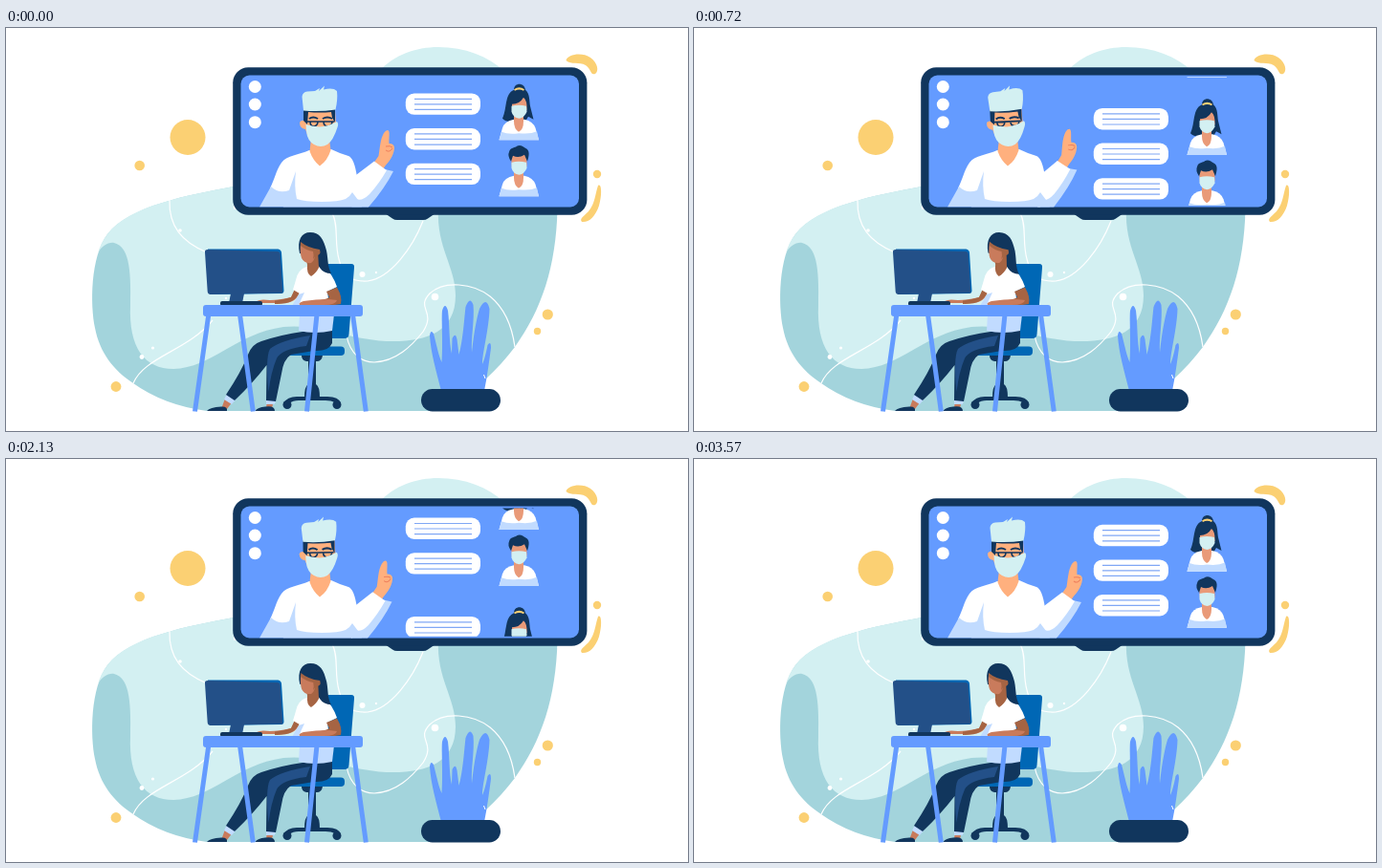
An HTML page with a canvas for the animation above (3.6 s loop, 713x422 px).

```html
<!DOCTYPE html>
<html lang="en">
<head>
<meta charset="utf-8">
<title>Online consultation</title>
<style>
  html, body { margin: 0; width: 100%; height: 100%; overflow: hidden; background: #fff; }
  canvas { display: block; }
</style>
</head>
<body>
<canvas id="stage" width="713" height="422"></canvas>
<script>
const ctx = document.getElementById('stage').getContext('2d');

const NAVY = '#11365d', BLUE = '#649bff', ROYAL = '#0067b5', DENIM = '#235088';
const MINT = '#d3f0f2', TEAL = '#a3d4dc', SKY = '#c1dbff', WHITE = '#fff', YELLOW = '#fbd073';
const PEACH = '#ffb07e', ROSE = '#e99a78', BROWN = '#a66443', TAN = '#c97b5c';

const LOOP = 3600, BEAT = 1800;
const SCROLL_TIME = 955, SCROLL_LEAD = 30, LIST_PERIOD = 140;

function fill(color, d) {
  ctx.fillStyle = color;
  ctx.fill(new Path2D(d));
}

function stroke(color, width, d) {
  ctx.strokeStyle = color;
  ctx.lineWidth = width;
  ctx.stroke(new Path2D(d));
}

function dot(color, x, y, r) {
  ctx.fillStyle = color;
  ctx.beginPath();
  ctx.arc(x, y, r, 0, Math.PI * 2);
  ctx.fill();
}

function box(color, x, y, w, h, r) {
  ctx.fillStyle = color;
  ctx.beginPath();
  ctx.roundRect(x, y, w, h, r);
  ctx.fill();
}

function turned(x, y, degrees, draw) {
  ctx.save();
  ctx.translate(x, y);
  ctx.rotate(degrees * Math.PI / 180);
  ctx.translate(-x, -y);
  draw();
  ctx.restore();
}

const easeSine = p => (1 - Math.cos(Math.PI * Math.min(1, Math.max(0, p)))) / 2;

function drawBackdrop() {
  fill(MINT, 'M389 46C406 28 428 20 452 20C480 20 503 29 522 46Z');
  fill(TEAL, 'M238 166C190 175 130 186 106 216C88 240 88 290 93 314C98 340 112 358 133 372Q165 395 210 401L460 401C490 380 515 357 532 334C560 295 575 250 576.500 190L238 190Z');
  fill(MINT, 'M238 166C190 175 128 186 106 216Q99 225 96 236C100 228 107 224 113 225C128 229 131 250 130 290C128 335 145 357 175 357C215 356 240 320 290 313C330 309 360 328 405 328C440 328 470 318 470 280C470 250 450 230 452 190L238 190Z');

  stroke(WHITE, 1.2, 'M171 180C170 208 184 224 210 235M341 194C348 206 343 224 348 242C352 260 362 266 378 265C402 262 425 230 436 202M356 322C360 342 372 350 385 350C408 349 424 333 436 318C450 296 428 294 443 278C458 264 488 267 506 281C522 294 529 312 532 334M133 372C145 344 190 338 216 306');
  dot(WHITE, 182, 212, 1.8);
  dot(WHITE, 372.5, 258, 3);
  dot(WHITE, 387, 256, 1.2);
  dot(WHITE, 448.5, 281.5, 3.8);
  dot(WHITE, 142, 344.5, 2.4);
  dot(WHITE, 153.5, 335, 1.6);
  dot(WHITE, 230, 283, 1.2);

  dot(YELLOW, 190, 114.5, 18.5);
  dot(YELLOW, 139.7, 144, 5.3);
  dot(YELLOW, 115, 375.5, 5.4);
  dot(YELLOW, 566.3, 300, 5.6);
  dot(YELLOW, 555.5, 317.5, 3.7);
  dot(YELLOW, 618, 153, 4.2);
  fill(YELLOW, 'M585.500 34C587 27 603 25 611 31C619 37 620 45 616 48C611 50 612 43 606 39C599 35 591 39 585.500 34Z');
  fill(YELLOW, 'M619 165C623 162 623 176 620 186C616 198 609 204 602 203C599 200 604 197 609 192C616 184 616 173 619 165Z');
}

function drawScreen() {
  fill(NAVY, 'M396 194L404 199.500Q406 201 409 201H436Q439 201 441 199.500L449 194Z');
  box(NAVY, 237.200, 41.200, 370.200, 154.500, 16);
  box(BLUE, 245.500, 49.500, 353.500, 138, 9);
  for (const y of [61.5, 80, 98.7]) dot(WHITE, 260.300, y, 6.5);
}

function drawMessage(y) {
  box(WHITE, 417.800, y, 78.200, 22.400, 9);
  for (const dy of [5.9, 11.4, 17]) stroke('#80a7f5', 1.2, `M427 ${y + dy}H487`);
}

function drawShoulders() {
  fill(WHITE, 'M531 96Q521 98 519 105L515.500 117.700H557L553.500 105Q551 98 542 96Z');
  fill(SKY, 'M518 109Q525 112 536 110.500Q548 112 555 108.500L557 117.700H515.500Z');
  fill(ROSE, 'M531 90H541V98Q541 107 536 109Q531 106 531 98Z');
}

function drawMask() {
  fill(MINT, 'M528.500 82Q536 80 544 82L544.500 88Q542 94 536.500 95Q530 94 528.500 88Z');
}

function drawWomanPatient() {
  fill(NAVY, 'M531 65C531 57 542 57 543 65C548 69 547 78 548 82L551.500 96L546 93L543 98H530Q523 99 519 95C524 85 521 69 531 65Z');
  fill(YELLOW, 'M531 64.500Q536.500 60.500 542 64.500L541 66Q536.500 63.500 532 66Z');
  drawShoulders();
  fill(ROSE, 'M529 80Q537 80 541 73Q545 76 544.500 86L529 88Z');
  drawMask();
}

function drawManPatient() {
  ctx.save();
  ctx.translate(0, 59);
  drawShoulders();
  fill(ROSE, 'M528 75Q537 70 544.500 75L544.500 86L529 88Z');
  drawMask();
  ctx.restore();
  fill(NAVY, 'M528 140Q524 134 526 130C527 125 532 126 534 124C538 122 541 125 543 126C548 128 547 134 545 140L542 133Q536 137 530 134Z');
}

function drawList(time) {
  const progress = easeSine(((time + SCROLL_LEAD) % BEAT) / SCROLL_TIME);
  ctx.save();
  ctx.beginPath();
  ctx.rect(410, 51.500, 155, 134.200);
  ctx.clip();
  for (let copy = 0; copy < 2; copy++) {
    ctx.save();
    ctx.translate(0, LIST_PERIOD * (copy - progress));
    for (let i = 0; i < 3; i++) drawMessage(68.8 + 36.6 * i);
    drawWomanPatient();
    drawManPatient();
    ctx.restore();
  }
  ctx.restore();
}

function drawDoctorHead() {
  fill(PEACH, 'M312 85H344L345 103Q341 121 329 123Q316 119 313 106Q307 105 307 99Q308 96 313 97Z');
  fill(NAVY, 'M311 85H344V99L341 94L340 88Q328 89 316 88L315 101L311 97Z');
  stroke(NAVY, 2, 'M317 95Q321 92 326 95M331 95Q336 92 341 95');
  stroke(NAVY, 1.600, 'M314 98H343M318 98Q318 103 322 103Q326 102 326 98M332 98Q332 103 337 103Q341 102 341 98');
  fill(MINT, 'M313.500 101Q321 103 328 103.500Q337 103 346 98Q348 100 346.500 104Q342 118 336 122Q329 126 322 122Q315 118 314 108Z');
  fill(MINT, 'M311 86.500L309.500 72Q310 67 315 66.500L323 66L328 63L327 66L333 60.500L332 64.500Q342 62 346 66Q347 75 344.500 85.500Q328 88 311 86.500Z');
}

function drawDoctorArm() {
  fill(PEACH, 'M399 107C402 107 400 116 400.500 121Q406 121 406 126C405 135 400 140 396 145L393 150L384 142L389.500 134C391 126 391 117 395 110Q397 107 399 107Z');
  stroke('#ee7f5c', 1, 'M397 124Q402 123 404 125M397 128Q401 131 404 126');
  fill(SKY, 'M364 178Q374 178 382 168Q390 158 396 148L405 150Q396 168 379 187.500V195H360Z');
  fill(WHITE, 'M358 160L385 139.500Q391 144 398 149Q390 163 380 174Q372 182 366 179L358 176Z');
}

function drawDoctor(sway) {
  ctx.save();
  ctx.beginPath();
  ctx.rect(246, 50, 353, 137.500);
  ctx.clip();
  turned(372, 240, -3.2 * sway, drawDoctorArm);
  fill(WHITE, 'M317 128C306 133 294 133 288 141C282 150 281 158 276 168L290 187.500H362L367 156Q364 136 358 134Q348 131 340 127Z');
  fill(SKY, 'M265 187.500L277 166Q285 174 296 170L303 150Q301 166 304 179Q312 182 330 182Q348 182 355 179Q360 176 362 172L368 180L372 187.500Z');
  fill(PEACH, 'M319 116H338L339.500 128Q336 139 328 144.500Q321 139 317.500 129Z');
  turned(328, 124, -2.8 * sway, drawDoctorHead);
  ctx.restore();
}

function drawPlant() {
  fill(BLUE, 'M455 380C450 360 444 340 443 322Q444 315 447 320C451 335 452 342 455.500 350C457 330 455 304 456 296Q459 286 462 296C464 312 463 328 466 341L466.500 325Q470 318 471.500 326L473.500 342C478 325 479 304 480.500 292Q485 280 488.500 290C490 305 486 325 487 340C489 320 492 304 495 294Q502 280 505.500 294C505 315 498 340 498 352C500 348 502 340 503.500 332Q507 327 507 335C505 350 503 365 500 380Z');
  stroke(WHITE, 1, 'M499.500 363L501 367');
  box(NAVY, 434, 378, 83, 23.500, 11.700);
}

function drawChair() {
  fill(ROYAL, 'M337 247H361Q364.500 247 364 251L358.500 321Q358 325 354 325H335Z');
  box(ROYAL, 286, 333.500, 68, 9.500, 4);
  fill(NAVY, 'M309 343H331Q330 349 325 349H314Q309 348 309 343ZM316 348H324V373Q328 375 328 387H312Q312 375 316 373Z');
  fill(NAVY, 'M290 393Q294 386 304 386H336Q348 386 350 393L344 392Q340 390 334 390H306Q300 390 296 393Z');
  dot(NAVY, 294, 394.500, 4.500);
  dot(NAVY, 346, 394.500, 4.500);
}

function drawLegs() {
  fill(TAN, 'M229 388L237 391L231 399H225ZM273 388H280L278 399H272Z');
  fill(SKY, 'M231 383L241 388L236 394L228 389ZM272 389H282L281 394H272Z');
  fill(NAVY, 'M210 401Q213 397 225 396.500Q232 396 231 401ZM260.500 401Q263 397 271 396.500Q281 395 281 401Z');
  fill(NAVY, 'M341 316V330Q337 339 322 338L298 342Q290 347 288 362L282 391L272 390L272.500 353Q257 373 239 390L230 384Q246 360 253 342Q257 331 267 328Q288 321 310 318Z');
  fill(DENIM, 'M318 322Q287 327 276 336Q271 345 274.500 381Q277 360 283 346Q288 336 314 333Z');
  fill(SKY, 'M307 300H343L341 317Q323 321 306 317Z');
}

function drawWomanHead() {
  fill(NAVY, 'M307 236C304 222 309 214 318 214C328 214 332 221 335 233C337 243 336 250 340 257Q332 257 328 251L319 239Z');
  fill(BROWN, 'M313 238L326 233L327 251Q324 257 319 260Q314 257 315 248Z');
  fill(TAN, 'M308 226Q315 231 323 232Q324 243 319 246Q312 247 309 241Q307 235 308 226Z');
  fill(BROWN, 'M308 224Q315 230 328 232Q330 238 324 238L321 242Q322 237 321 234Q314 233 308 228Z');
}

function drawWoman(sway) {
  fill(TAN, 'M303 273L298 282Q281 286 269 284.500Q260 285 262 288H290Q304 288 307 276Z');
  fill(BROWN, 'M302 273L298 282Q289 285 281 285.500L281 289Q302 290 307 276Z');
  fill(WHITE, 'M314 250Q305 253 303 264L300 274L307 278L300 291H338L336 276L346 271Q341 257 334 252L326 249Z');
  fill(SKY, 'M306 279L299 291H306Q308 285 312 277Z');
  turned(320, 252, 2 * sway, drawWomanHead);
  fill(BROWN, 'M335 276L346 271.500Q352 282 350 289Q337 292 322 290L320 286Q333 285 338 282Z');
  fill(TAN, 'M337 284Q324 284 311 286Q305 288 307 290H332Q345 290 346 285Z');
}

function drawDesk() {
  fill(ROYAL, 'M211 231.500H284.500Q287.500 232 288 235L290.500 275Q290.500 278 287.500 278L213 279Z');
  fill(DENIM, 'M208 235Q207.500 232 211 232L283.500 234Q286.500 234 286.700 237L289.300 277.500L214 279Q211 279 210.700 276Z');
  fill(DENIM, 'M235 278H249L247 288H233Z');
  box(NAVY, 224, 286, 44, 5, 2);
  stroke(BLUE, 5, 'M211.800 300L197.500 401.500M244.500 300L258.300 401.500M325 300L314.500 401.500M362.500 300L376.300 401.500');
  box(BLUE, 206, 290, 167, 12, 3);
}

function draw(time) {
  const sway = (1 - Math.cos(2 * Math.PI * time / BEAT)) / 2;
  ctx.fillStyle = WHITE;
  ctx.fillRect(0, 0, 713, 422);
  drawBackdrop();
  drawScreen();
  drawDoctor(sway);
  drawList(time);
  drawPlant();
  drawChair();
  drawLegs();
  drawWoman(sway);
  drawDesk();
}

const start = performance.now();
function tick() {
  draw((performance.now() - start) % LOOP);
  requestAnimationFrame(tick);
}
tick();
</script>
</body>
</html>
```
